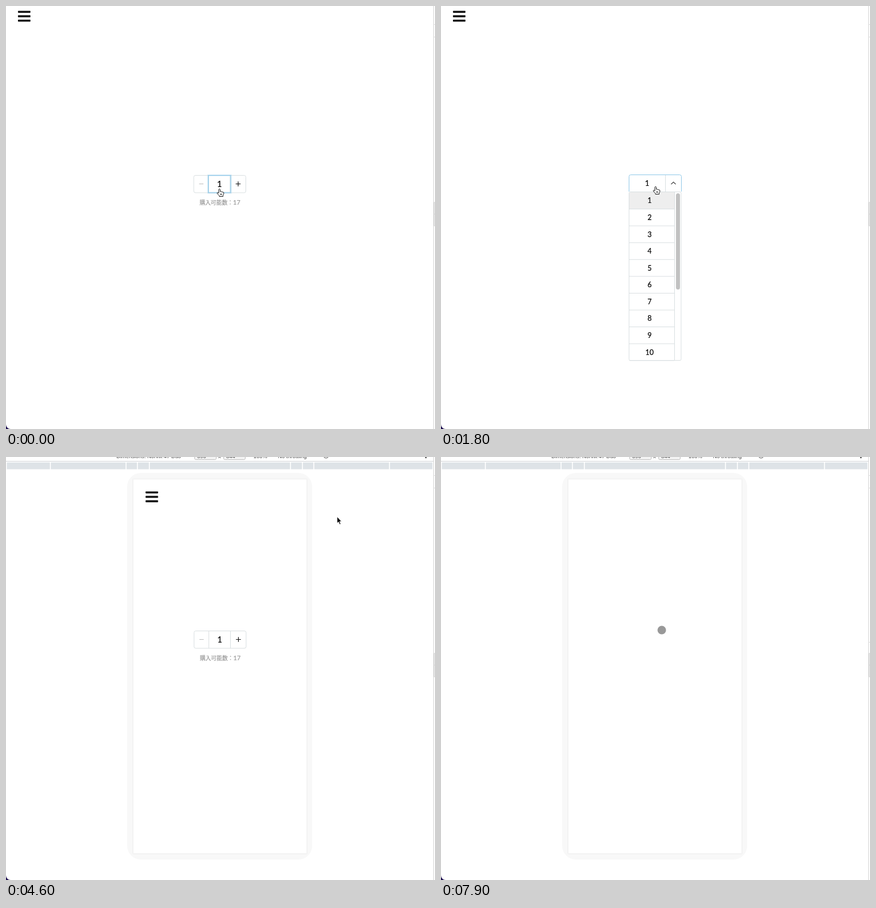
Animation, 754 px wide and 743 px high, one loop 8 s. Source, as an HTML page:

```html
<!DOCTYPE html>
<html lang="ja">
<head>
<meta charset="utf-8">
<title>Quantity picker</title>
<style>
html, body { margin: 0; width: 100%; height: 100%; overflow: hidden; background: #fff; }
svg { display: block; width: 100%; height: 100%; }
text { font-family: Lato, "Noto Sans CJK JP", "Noto Sans CJK", sans-serif; text-anchor: middle; stroke: #000; stroke-width: .2; }
.note { fill: #999; stroke: #999; }
.bar text { font: 9.4px "Liberation Sans", sans-serif; text-anchor: start; fill: #444; stroke: none; }
.bar rect { fill: #f3f3f3; stroke: #bbb; }
.line { fill: none; stroke: #d9dfe1; }
.ring { fill: none; stroke: #8fc8e8; }
</style>
</head>
<body>
<svg viewBox="0 0 754 743">
  <g id="device">
    <g class="bar">
      <rect x="331.5" y="-10" width="38" height="14.5" rx="2"/>
      <rect x="382.5" y="-10" width="38" height="14.5" rx="2"/>
      <text x="194" y="2">Dimensions: Norvik 47 Duo</text>
      <text x="336" y="2">390</text>
      <text x="373" y="2.4">x</text>
      <text x="387" y="2">844</text>
      <text x="435" y="2">100%</text>
      <text x="478" y="2">No throttling</text>
      <circle cx="562.5" cy="-2" r="4" fill="none" stroke="#555"/>
      <circle cx="738" cy="1" r="1.3" fill="#444"/>
    </g>
    <path d="M0 7.5H751" stroke="#d0d3d6"/>
    <path d="M1.5 15.5H749.5" stroke="#dee3e7" stroke-width="12"/>
    <path id="marks" stroke="#fff" stroke-width="1.6"/>
    <rect x="213" y="28" width="325" height="679" rx="24" fill="#f8f8f8"/>
    <rect x="222" y="37.5" width="308" height="660.5" rx="2" fill="#f3f3f3"/>
    <rect x="224" y="39.5" width="304" height="656.5" fill="#fff"/>
  </g>
  <g id="menu"></g>
  <g id="stepper">
    <rect class="line" x="330" y="297.5" width="91.5" height="30.5" rx="3"/>
    <path class="line" d="M356 297.5V328M394 297.5V328"/>
    <path d="M339.5 312.5H347" stroke="#bbb"/>
    <path d="M403.7 312.5H412.3M408 308.2V316.8" stroke="#111" stroke-width="1.2"/>
    <g id="focus" class="ring">
      <rect x="355.5" y="297.5" width="39.5" height="30.5" stroke-width="3" opacity=".35"/>
      <rect x="355.5" y="297.5" width="39.5" height="30.5"/>
    </g>
    <text x="375.3" y="318" font-size="14.5">1</text>
    <text class="note" x="376" y="349" font-size="9.8">購入可能数：<tspan font-size="11">17</tspan></text>
  </g>
  <g id="list">
    <path class="ring" d="M330.5 326V299.5Q330.5 296.5 333.5 296.5H419.5Q422.5 296.5 422.5 299.5V326"/>
    <path class="line" d="M394.5 297V326"/>
    <path d="M404.5 313.2L408.5 309.2L412.5 313.2" fill="none" stroke="#222" stroke-width="1.1"/>
    <text x="362.3" y="316" font-size="13">1</text>
    <rect class="line" x="330.5" y="326.5" width="91.5" height="296" rx="2"/>
    <rect x="331" y="327" width="79.5" height="29.5" fill="#eee"/>
    <g id="rows"></g>
    <path class="line" d="M410.5 327V622"/>
    <rect x="413" y="329" width="7" height="169" rx="3.5" fill="#c1c1c1"/>
  </g>
  <g stroke="#d4d4d4" fill="#f2f2f2">
    <path d="M751.5 0V743"/>
    <path d="M754 32.5H752.5M754 54.5H752.5"/>
    <rect x="752.5" y="345" width="4" height="41"/>
    <path d="M752.5 365.5H754"/>
    <path id="tick" d="M752.5 325.5H754"/>
  </g>
  <path d="M0 735A8 8 0 0 0 8 743H0Z" fill="#180a4c"/>
  <path id="arrow" d="M0 0V11.2L2.5 8.9L4.5 13.4L6.3 12.6L4.4 8.3H7.6Z" stroke="#fff" stroke-width=".7"/>
  <path id="hand" d="M-1.6 7.8V1.3Q-1.4 .2 -.3 .3Q.8 .4 .9 1.5V5Q2.5 4.3 3.2 5.4Q4.7 4.8 5.3 6Q7.2 5.7 7.3 7.4Q7.2 10 5.9 11.7V13.6H-.6V12.3Q-2.3 10.6 -4.4 7.9Q-4.4 6.5 -3 6.6ZM1.5 8.5V11.2M3.4 8.5V11.2" fill="#fff" stroke="#111"/>
  <circle id="touch" r="7.5" fill="#999"/>
</svg>
<script>
const $ = id => document.getElementById(id);
const show = (id, on) => $(id).setAttribute('display', on ? 'inline' : 'none');
const move = (id, x, y) => $(id).setAttribute('transform', `translate(${x} ${y})`);
const within = (v, a, b) => v >= a && v < b;
const repeat = (n, make) => Array.from({ length: n }, (_, i) => make(i)).join('');

const LOOP = 8000, STEP = 100;
const ROW = 29.58, BAR = 7.86;
const DEVICE_AT = 4600, RELOAD_AT = 7800;

// Each glide starts at `from`, lasts `ms` and ends at x, y
const glides = [
  { from: 0, ms: 0, x: 375.5, y: 321 },
  { from: 600, ms: 300, x: 527.5, y: 361 },
  { from: 1100, ms: 500, x: 377.5, y: 317 },
  { from: 1800, ms: 500, x: 202.5, y: 407 },
  { from: 2500, ms: 300, x: 374.5, y: 309 },
  { from: 3600, ms: 0, x: 439.5, y: 295 },
  { from: DEVICE_AT, ms: 0, x: 582, y: 105 },
  { from: 5500, ms: 500, x: 370, y: 335.5 },
  { from: 6100, ms: 300, x: 373.5, y: 328.5 },
  { from: 6500, ms: 200, x: 388, y: 304 }
];
const easeOut = p => 1 - (1 - p) ** 3;

function pointer(t) {
  let x = 0, y = 0;
  for (const g of glides) {
    if (t < g.from) break;
    const k = g.ms ? easeOut(Math.min(1, (t - g.from) / g.ms)) : 1;
    x += (g.x - x) * k;
    y += (g.y - y) * k;
  }
  return [x, y];
}

// Ruler breakpoints mirror around the centre
$('marks').setAttribute('d', [124, 145, 165, 298].map(d => `M${376 - d} 9V22M${376 + d} 9V22`).join(''));
$('menu').innerHTML = repeat(3, i =>
  `<rect x="21" y="${8.4 + i * BAR}" width="22" height="3.5" rx=".8" fill="#111"/>`);
$('rows').innerHTML = repeat(10, i => {
  const y = 327 + i * ROW;
  return `<text x="366.5" y="${y + 19.4}" font-size="12.5">${i + 1}</text>
    <path class="line" d="M331 ${y + ROW}H410"/>`;
});

function draw(t) {
  const device = t >= DEVICE_AT;
  const loaded = t < RELOAD_AT;
  const open = within(t, 300, 900) || within(t, 1800, 2500);
  show('device', device);
  show('menu', loaded);
  move('menu', device ? 224.3 : 0, device ? 52 : 0);
  show('stepper', loaded && !open);
  move('stepper', device ? .5 : 0, device ? 8 : 0);
  show('list', open);
  show('focus', t < 300 || within(t, 1600, 1800) || within(t, 2800, 3600));
  show('tick', t >= 7300);

  const [x, y] = pointer(t);
  const visible = !within(t, 3000, 3600) && !within(t, 4100, DEVICE_AT);
  const touch = device && x < 528;
  const hand = !device && within(x, 330, 422) && within(y, 296, open ? 622 : 328);
  show('touch', visible && touch);
  show('hand', visible && hand);
  show('arrow', visible && !touch && !hand);
  ['touch', 'hand', 'arrow'].forEach(id => move(id, x, y));
}

const start = performance.now();
function tick() {
  const t = (performance.now() - start) % LOOP;
  draw(Math.floor(t / STEP) * STEP);
  requestAnimationFrame(tick);
}
tick();
</script>
</body>
</html>
```
